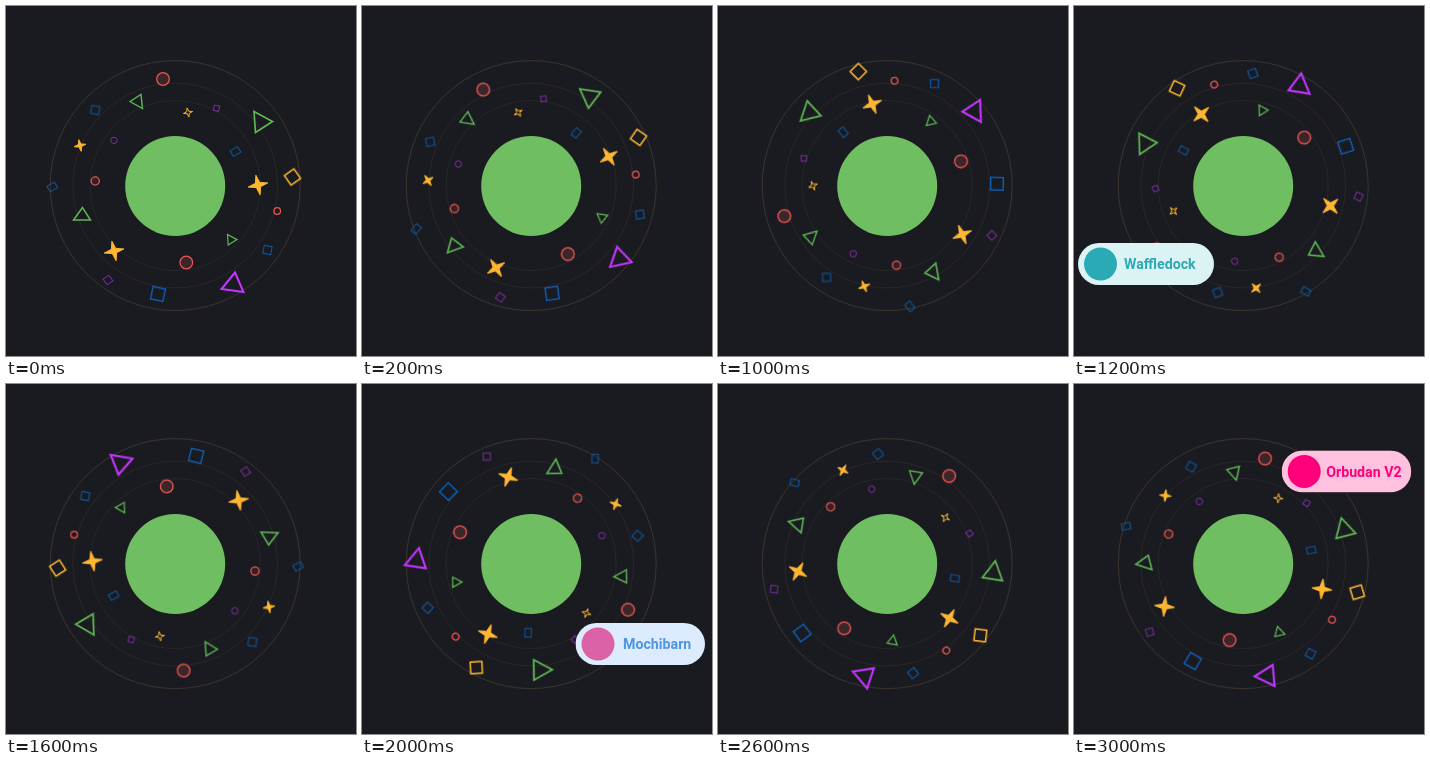
Write an HTML page that moves like this. It is 350 px wide and 350 px high and loops after 3.2 s.

```html
<!DOCTYPE html>
<html lang="en">
<head>
<meta charset="utf-8">
<title>Orbit</title>
<style>
  html, body { margin: 0; width: 100%; height: 100%; overflow: hidden; background: #1a1b20; }
  svg { display: block; width: 350px; height: 350px; }
  text { font: 700 14.2px Roboto, Arial, sans-serif; }
</style>
</head>
<body>
<svg id="stage" viewBox="0 0 350 350" fill="none"></svg>
<script>
const CX = 169.2, CY = 179.6, LOOP = 3200;

// Rotation in degrees, held for one sixteenth of the loop each.
const TURN = [0, 20, 40, 60, 80, 100, 120, 140, 178, 218, 238, 258, 278, 318.2, 330, 341.7];

const GREEN = '#60b855', BLUE = '#0d59a6', PURPLE = '#7b2da3', RED = '#f0544f', GOLD = '#ffb630';
const stage = document.getElementById('stage');

function add(parent, tag, attrs) {
  const el = document.createElementNS('http://www.w3.org/2000/svg', tag);
  for (const key in attrs) el.setAttribute(key, attrs[key]);
  parent.appendChild(el);
  return el;
}

const ring = (r, stroke) =>
  add(stage, 'circle', { cx: CX, cy: CY, r, stroke, 'stroke-width': 0.8 });
ring(125, '#433b30');
ring(102.3, '#33292a');
ring(85, '#282a2b');

const orbit = add(stage, 'g', {});

function box(x, y, w, h, tilt, stroke, width) {
  add(orbit, 'rect', {
    x: -w / 2, y: -h / 2, width: w, height: h, stroke, 'stroke-width': width,
    transform: `translate(${x} ${y}) rotate(${tilt})`
  });
}

function dot(cx, cy, r, stroke, width, fill = 'none') {
  add(orbit, 'circle', { cx, cy, r, stroke, fill, 'stroke-width': width });
}

function tri(points, stroke, width) {
  add(orbit, 'polygon', { points, stroke, 'stroke-width': width });
}

// Four sharp arms that meet in a narrow waist.
function star(x, y, r, paint) {
  const k = r * 0.22;
  add(orbit, 'polygon', {
    points: [0, -r, k, -k, r, 0, k, k, 0, r, -k, k, -r, 0, -k, -k].join(' '),
    'stroke-linejoin': 'round', transform: `translate(${x} ${y}) rotate(-12)`, ...paint
  });
}

box(286.5, 171, 11.6, 11.6, 55, GOLD, 1.5);
box(152, 288, 12.6, 12.6, 12, '#0c63c0', 1.3);
box(89.3, 104, 8, 8, 9, BLUE, 1);
box(261.5, 244, 8, 8, 10, BLUE, 1);
box(229.5, 145.5, 6.4, 8.6, 60, BLUE, 1);
box(46.3, 181, 6.4, 8.6, 60, BLUE, 1);
box(102, 274, 7, 7, 55, PURPLE, 1);
box(210.5, 102.2, 5.4, 5.4, 12, PURPLE, 1);

dot(157, 73, 6.3, RED, 1.3, '#3b272b');
dot(180.3, 256.5, 6.3, RED, 1.3, '#3b272b');
dot(89.2, 175, 4.1, RED, 1.3, '#2e2327');
dot(271.2, 205, 3.3, RED, 1.2);
dot(108, 134.4, 3.2, PURPLE, 1);

tri('248,105.5 249.5,126.5 266.5,115.5', GREEN, 1.7);
tri('76.5,201.5 67.5,214 84.5,214', GREEN, 1.5);
tri('124,95.5 135,88.5 136.5,102.5', GREEN, 1.4);
tri('221.5,228.5 222.2,239 231,233.6', GREEN, 1.2);
tri('229,266.5 215.5,283 237.5,286', '#c535ff', 2);

const solid = { fill: GOLD, stroke: GOLD, 'stroke-width': 0.9 };
star(252, 179, 10, solid);
star(108, 245, 10, solid);
star(74, 139.5, 6, solid);
star(182, 106.5, 4.7, { stroke: GOLD, 'stroke-width': 0.9 });

add(stage, 'circle', { cx: CX, cy: 180, r: 50, fill: '#70be62' });

// Each badge is shown for two steps, beginning at `step`.
const PINK = '#ff007a', ROSE = '#ffc1de';
const BADGES = [
  { step: 2, x: 23, y: 62, w: 130, label: 'Orbudan V3', tx: 44.5, bg: ROSE, ink: PINK, icon: PINK },
  { step: 6, x: 4, y: 237, w: 136, label: 'Waffledock', tx: 46, bg: '#dcf3f5', ink: '#2ba9b4', icon: '#2ba9b4' },
  { step: 10, x: 213.5, y: 239, w: 129.5, label: 'Mochibarn', tx: 47.5, bg: '#dcebfe', ink: '#4f95e2', icon: '#dc62a8' },
  { step: 14, x: 207.7, y: 66.4, w: 129.5, label: 'Orbudan V2', tx: 44.5, bg: ROSE, ink: PINK, icon: PINK }
];

const timing = { duration: LOOP, iterations: Infinity };
const hold = (offset, style) => ({ offset, easing: 'step-end', ...style });
const steps = TURN.length;
const anims = [];

for (const b of BADGES) {
  const g = add(stage, 'g', { transform: `translate(${b.x} ${b.y})` });
  add(g, 'rect', { width: b.w, height: 42, rx: 21, fill: b.bg });
  add(g, 'circle', { cx: 22.5, cy: 21, r: 16.5, fill: b.icon });
  add(g, 'text', { x: b.tx, y: 26.2, fill: b.ink }).textContent = b.label;
  const end = (b.step + 2) / steps;
  const frames = [hold(0, { opacity: 0 }), hold(b.step / steps, { opacity: 1 })];
  if (end < 1) frames.push(hold(end, { opacity: 0 }));
  frames.push(hold(1, { opacity: end < 1 ? 0 : 1 }));
  anims.push(g.animate(frames, timing));
}

orbit.style.transformOrigin = `${CX}px ${CY}px`;
const turns = [...TURN, 360].map((a, i) => hold(i / steps, { transform: `rotate(${-a}deg)` }));
anims.push(orbit.animate(turns, timing));

for (const a of anims) a.startTime = 0;
</script>
</body>
</html>
```
